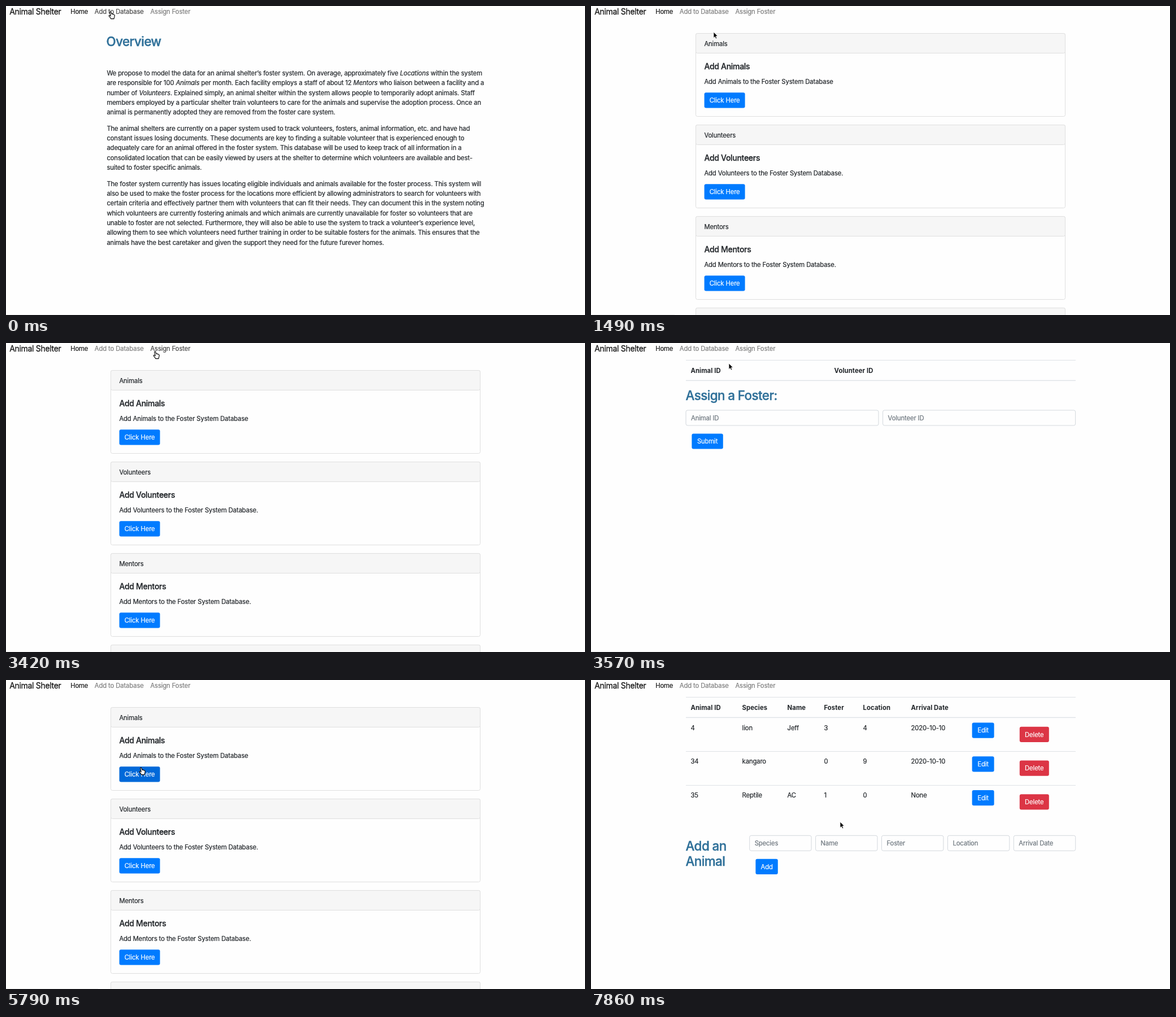
Recreate the animation shown at these times as an HTML page. Size 1025 by 547 pixels, loop 8000 ms.

```html
<!DOCTYPE html>
<html lang="en">
<head>
<meta charset="utf-8">
<title>Shelter demo</title>
<style>
  html, body { margin: 0; width: 100%; height: 100%; overflow: hidden; background: #fefefe; }
  svg { display: block; }
  text {
    font: 400 11.3px Inter, "Open Sans", sans-serif;
    font-optical-sizing: none;
    letter-spacing: -.0115em;
    color: #212529;
    fill: currentColor;
    stroke: currentColor;
    stroke-width: .018em;
    white-space: pre;
  }
  .brand { font-size: 14px; letter-spacing: -.022em; color: #181818; }
  .nav { color: #7f7f7f; }
  .nav.active { color: #181818; }
  .nav.hover { color: #4a4a4a; }
  .heading { font-size: 22.4px; font-weight: 500; letter-spacing: -.026em; color: #2f7099; }
  .title { font-size: 14px; font-weight: 500; letter-spacing: -.021em; }
  .th { font-weight: 700; letter-spacing: .008em; stroke: none; }
  .hint { color: #6c757d; }
  .label { color: #fff; text-anchor: middle; }
  .italic { font-style: italic; }
  .primary { fill: #007bff; }
  .danger { fill: #dc3545; }
  .card { fill: #fefefe; stroke: #dfdfdf; }
  .cardHead { fill: #f6f6f6; stroke: #dfdfdf; }
  .input { fill: #fefefe; stroke: #ced4da; stroke-width: .9; }
  .rule { fill: #dee2e6; }
  .dark .primary { fill: #0069d9; }
  .ring .primary { stroke: #80bdff; stroke-width: 4.6; paint-order: stroke; }
  .hidden { display: none; }
</style>
</head>
<body>
<svg id="stage" width="1025" height="547" viewBox="0 0 1025 547"></svg>
<script>
const text = (x, y, content, cls = '') => `<text x="${x}" y="${y}" class="${cls}">${content}</text>`;
const rect = (x, y, w, h, cls, r = 0) =>
  `<rect x="${x}" y="${y}" width="${w}" height="${h}" rx="${r}" class="${cls}"/>`;
const button = (x, y, w, label, cls = 'primary', id = '') =>
  `<g id="${id}">${rect(x, y, w, 27.2, cls, 3)}${text(x + w / 2, y + 17.8, label, 'label')}</g>`;
const input = (x, y, w, hint) => rect(x, y, w, 27, 'input', 3) + text(x + 9, y + 17.7, hint, 'hint');
const rule = (y, h = 1) => rect(168, y, 690, h, 'rule');
const headers = (columns, names) => rule(30) + rule(65.7, 1.4) +
  names.map((name, i) => text(columns[i], 52.6, name, 'th')).join('');

const paragraphs = [
`We propose to model the data for an animal shelter’s foster system. On average, approximately five *Locations* within the system
are responsible for 100 *Animals* per month. Each facility employs a staff of about 12 *Mentors* who liaison between a facility and a
number of *Volunteers*. Explained simply, an animal shelter within the system allows people to temporarily adopt animals. Staff
members employed by a particular shelter train volunteers to care for the animals and supervise the adoption process. Once an
animal is permanently adopted they are removed from the foster care system.`,
`The animal shelters are currently on a paper system used to track volunteers, fosters, animal information, etc. and have had
constant issues losing documents. These documents are key to finding a suitable volunteer that is experienced enough to
adequately care for an animal offered in the foster system. This database will be used to keep track of all information in a
consolidated location that can be easily viewed by users at the shelter to determine which volunteers are available and best-
suited to foster specific animals.`,
`The foster system currently has issues locating eligible individuals and animals available for the foster process. This system will
also be used to make the foster process for the locations more efficient by allowing administrators to search for volunteers with
certain criteria and effectively partner them with volunteers that can fit their needs. They can document this in the system noting
which volunteers are currently fostering animals and which animals are currently unavailable for foster so volunteers that are
unable to foster are not selected. Furthermore, they will also be able to use the system to track a volunteer’s experience level,
allowing them to see which volunteers need further training in order to be suitable fosters for the animals. This ensures that the
animals have the best caretaker and given the support they need for the future furever homes.`];

function overview() {
  let y = 123, out = text(177.6, 71, 'Overview', 'heading');
  for (const paragraph of paragraphs) {
    for (const line of paragraph.split('\n')) {
      out += text(178.4, y.toFixed(2), line.replace(/\*(.+?)\*/g, '<tspan class="italic">$1</tspan>'));
      y += 17.28;
    }
    y += 11.52;
  }
  return out;
}

function cards() {
  return ['Animals', 'Volunteers', 'Mentors', 'Locations'].map((name, i) => {
    const y = 48.5 + i * 162;
    return rect(185.5, y, 654, 147, 'card', 3) + rect(185.5, y, 654, 35, 'cardHead', 3) +
      text(200.4, y + 22.1, name) +
      text(200.4, y + 63.7, `Add ${name}`, 'title') +
      text(200.4, y + 89, `Add ${name} to the Foster System Database${i ? '.' : ''}`) +
      button(200.6, y + 104.7, 72, 'Click Here', 'primary', i ? '' : 'firstButton');
  }).join('');
}

const assign = () =>
  headers([176.4, 430.6], ['Animal ID', 'Volunteer ID']) +
  text(167.5, 101, 'Assign a Foster:', 'heading') +
  input(168, 119, 341, 'Animal ID') + input(516.6, 119, 341, 'Volunteer ID') +
  button(178.4, 160.4, 55.4, 'Submit');

function animals() {
  const columns = [176.4, 267.6, 347.6, 412.4, 481.6, 566.6];
  const rows = [
    ['4', 'lion', 'Jeff', '3', '4', '2020-10-10'],
    ['34', 'kangaro', '', '0', '9', '2020-10-10'],
    ['35', 'Reptile', 'AC', '1', '0', 'None']];
  const body = rows.map((row, i) => {
    const y = i * 59.7;
    return (i ? rule(Math.round(66.4 + y)) : '') +
      row.map((cell, c) => text(columns[c], 88.6 + y, cell)).join('') +
      button(674.6, 75.6 + y, 39, 'Edit') + button(758.8, 82.8 + y, 52, 'Delete', 'danger');
  }).join('');
  const fields = ['Species', 'Name', 'Foster', 'Location', 'Arrival Date']
    .map((name, i) => input(280.7 + i * 116.9, 275.3, 109.4, name)).join('');
  return headers(columns, ['Animal ID', 'Species', 'Name', 'Foster', 'Location', 'Arrival Date']) +
    body + fields + button(291.4, 316.8, 39.4, 'Add') +
    text(167.5, 302, 'Add an', 'heading') + text(167.5, 329.4, 'Animal', 'heading');
}

// Each pointer is drawn around its hot spot
const pointers = {
  arrow: '<path d="M0 0V10.6L2.4 8.4 4 12 5.8 11.2 4.2 7.6H7.4Z" fill="#000" stroke="#fff" stroke-width=".8"/>',
  hand: '<path d="M-1.2 .9Q0-.6 1 .9L2 4.2Q3.4 3.5 4.2 4.6 5.6 4.2 6.2 5.6 7.5 5.6 7.3 7.6L6 12.6H.8Q-.8 9.8-2.8 7.6-2.8 6.2-1.2 6.6L.2 7.6Z" fill="#fff" stroke="#000" stroke-width="1.1"/>',
  beam: '<path d="M-2.3-5.5Q0-5.5 0-4Q0-5.5 2.3-5.5M0-4V4M-2.3 5.5Q0 5.5 0 4Q0 5.5 2.3 5.5M-1.2 2H1.2" fill="none" stroke="#222" stroke-width="1"/>'
};
const pages = { overview, cards, assign, animals };
const group = (id, content) => `<g id="${id}" class="hidden">${content}</g>`;
const groups = set => Object.entries(set).map(([id, content]) => group(id, content)).join('');

document.getElementById('stage').innerHTML =
  text(6.2, 15.1, 'Animal Shelter', 'brand') +
  text(114.2, 14.4, 'Home', 'nav active') +
  `<g id="navAdd">${text(156.8, 14.4, 'Add to Database', 'nav')}</g>` +
  `<g id="navAssign">${text(255.4, 14.4, 'Assign Foster', 'nav')}</g>` +
  Object.entries(pages).map(([id, draw]) => group(id, draw())).join('') +
  '<rect id="status" y="546" height="1" fill="#f2f2f2"/>' +
  `<g id="pointer">${groups(pointers)}</g>`;

// time, page, pointer, x, y, hovered part, width of the status strip
const steps = [
  [0, 'overview', 'hand', 185, 10, 'navAdd', 148],
  [440, 'cards', 'hand', 185, 10, 'navAdd', 148],
  [1190, 'cards', 'hand', 188, 11, 'navAdd', 148],
  [1340, 'cards', 'arrow', 200, 27, '', 148],
  [1490, 'cards', 'arrow', 217, 46, '', 148],
  [1640, 'cards', 'beam', 228, 62, '', 148],
  [1790, 'cards', 'beam', 232, 67, '', 148],
  [2530, 'cards', 'arrow', 248, 41, '', 148],
  [2680, 'cards', 'hand', 264, 17, 'navAssign', 148],
  [2830, 'cards', 'hand', 270, 12, 'navAssign', 148],
  [2970, 'cards', 'hand', 271, 11, 'navAssign', 148],
  [3420, 'cards', 'hand', 264, 15, 'navAssign', 148],
  [3570, 'assign', 'arrow', 244, 36, '', 176],
  [4160, 'assign', 'arrow', 238, 26, '', 176],
  [4310, 'assign', 'hand', 230, 14, 'navAdd', 176],
  [4460, 'assign', 'hand', 227, 10, 'navAdd', 176],
  [5050, 'assign', 'arrow', 231, 48, 'navAdd', 176],
  [5200, 'assign', 'beam', 237.5, 107, 'navAdd', 176],
  [5350, 'cards', 'beam', 237.5, 107, '', 163],
  [5640, 'cards', 'beam', 238, 124, '', 163],
  [5790, 'cards', 'hand', 239, 155, 'firstButton', 163],
  [5930, 'cards', 'hand', 240, 164, 'firstButton', 163],
  [6080, 'cards', 'hand', 240, 166, 'firstButton', 163],
  [6520, 'cards', 'hand', 240, 166, 'firstButton focus', 163],
  [6670, 'cards', 'arrow', 278, 196, 'firstButton focus', 163],
  [6810, 'cards', 'arrow', 306, 219, 'firstButton focus', 163],
  [6960, 'animals', 'arrow', 306, 219, '', 0],
  [7710, 'animals', 'arrow', 390, 240, '', 0],
  [7860, 'animals', 'arrow', 441, 251, '', 0]
];

const el = id => document.getElementById(id);
const show = (set, chosen) => {
  for (const id in set) el(id).classList.toggle('hidden', id !== chosen);
};
let current;

function render(now) {
  const time = now % 8000;
  const step = steps.findLast(([start]) => start <= time);
  if (step !== current) {
    current = step;
    const [, page, pointer, x, y, hover, status] = step;
    show(pages, page);
    show(pointers, pointer);
    el('pointer').setAttribute('transform', `translate(${x} ${y})`);
    el('status').setAttribute('width', status);
    for (const id of ['navAdd', 'navAssign'])
      el(id).firstChild.classList.toggle('hover', hover === id);
    el('firstButton').classList.toggle('dark', hover.startsWith('firstButton'));
    el('firstButton').classList.toggle('ring', hover.endsWith('focus'));
  }
}

const origin = performance.now();
function tick() {
  render(performance.now() - origin);
  requestAnimationFrame(tick);
}
tick();
</script>
</body>
</html>
```
